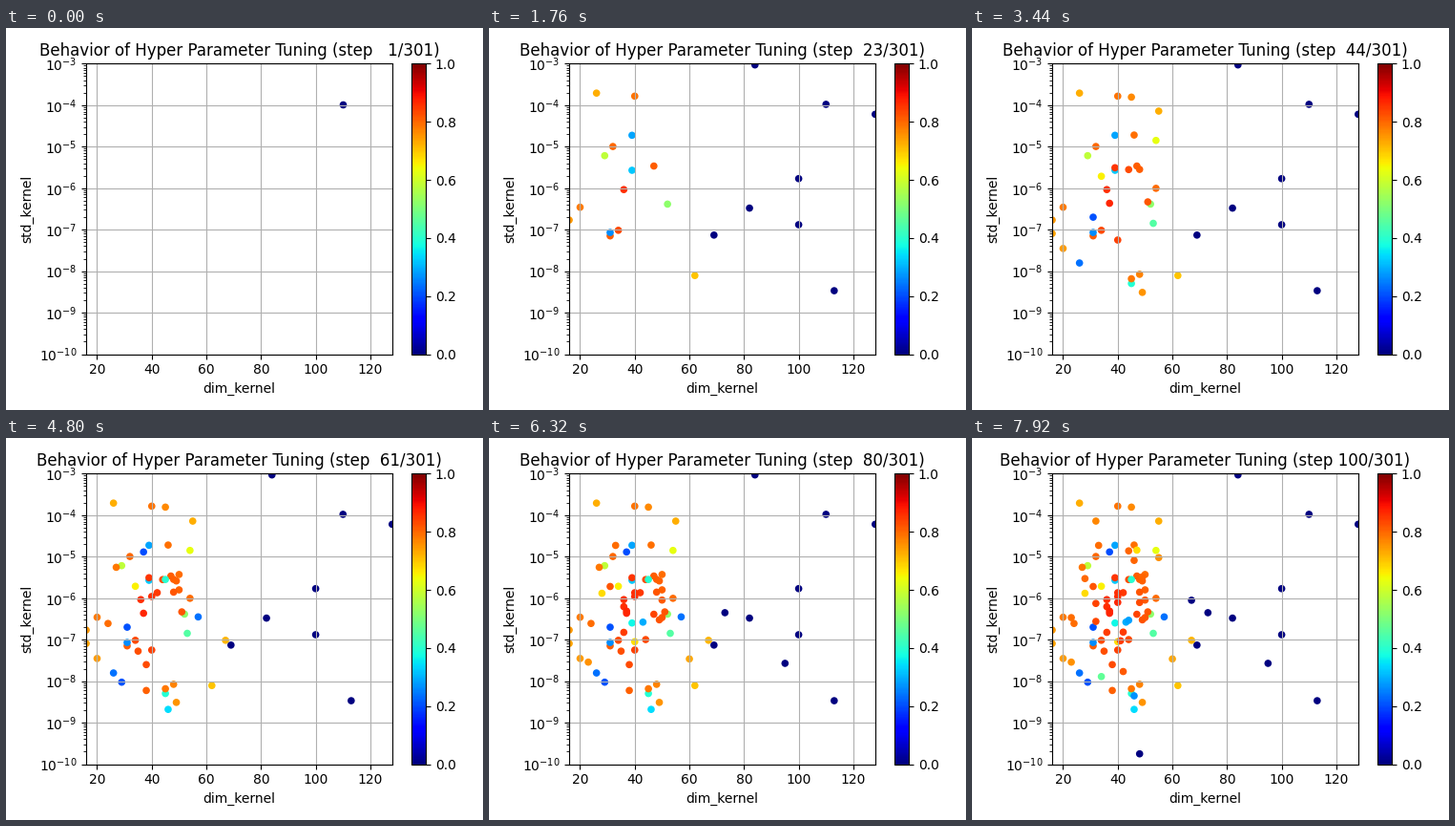
Recreate the animation shown at these times as a matplotlib script. Size 500 by 400 pixels, loop 8000 ms.

```python
import numpy as np
import matplotlib.pyplot as plt
from matplotlib.animation import FuncAnimation
from matplotlib.ticker import LogLocator, NullFormatter

WIDTH, HEIGHT, DPI = 500, 400, 100
STEPS, TOTAL, INTERVAL = 100, 301, 80

# Failed trials (kernel size, log10 of std): frequent early, rare later
FAILED = [(110, -3.98), (84, -3.03), (128, -4.22), (100, -5.77),
          (100, -6.88), (113, -8.47), (82, -6.48), (69, -7.13),
          (73, -6.35), (95, -7.57), (67, -6.05), (48, -9.75)]
FAILED_STEPS = [*range(1, 23, 3), *range(70, 101, 10)]
BEST = (39, -6.3)


def search_trial(step, rng):
    """Sample around the best setting, closing in on it as steps go by."""
    spread = 1.6 - 0.8 * step / STEPS
    size = np.clip(round(rng.normal(BEST[0], 9 * spread)), 16, 67)
    log_std = np.clip(rng.normal(BEST[1], 0.95 * spread), -10, -3.05)
    score = 0.88 - 0.005 * abs(size - BEST[0]) - 0.035 * abs(log_std - BEST[1])
    if rng.random() < 0.25:
        score = rng.uniform(0.2, 0.68)
    return size, log_std, score


def make_trials():
    rng = np.random.default_rng(12)
    failed = dict(zip(FAILED_STEPS, FAILED))
    return np.array([(*failed[step], 0) if step in failed
                     else search_trial(step, rng)
                     for step in range(1, STEPS + 1)])


def heading(step):
    return f"Behavior of Hyper Parameter Tuning (step {step:3d}/{TOTAL})"


plt.rcParams["font.family"] = "DejaVu Sans"
sizes, log_stds, scores = make_trials().T
points = np.column_stack([sizes, 10 ** log_stds])

fig, ax = plt.subplots(figsize=(WIDTH / DPI, HEIGHT / DPI), dpi=DPI)
dots = ax.scatter([], [], c=[], s=20, cmap="jet", vmin=0, vmax=1)
fig.colorbar(dots)
ax.set(xlim=(16, 128), yscale="log", ylim=(1e-10, 1e-3),
       xlabel="dim_kernel", ylabel="std_kernel")
ax.yaxis.set_major_locator(LogLocator(numticks=20))
ax.yaxis.set_minor_locator(LogLocator(subs=range(2, 10), numticks=100))
ax.yaxis.set_minor_formatter(NullFormatter())
ax.grid(True)
title = ax.set_title(heading(1))
fig.tight_layout()


def update(frame):
    step = frame + 1
    dots.set_offsets(points[:step])
    dots.set_array(scores[:step])
    title.set_text(heading(step))
    return dots, title


anim = FuncAnimation(fig, update, frames=STEPS, interval=INTERVAL,
                     repeat=True, repeat_delay=0)
plt.show()
```
